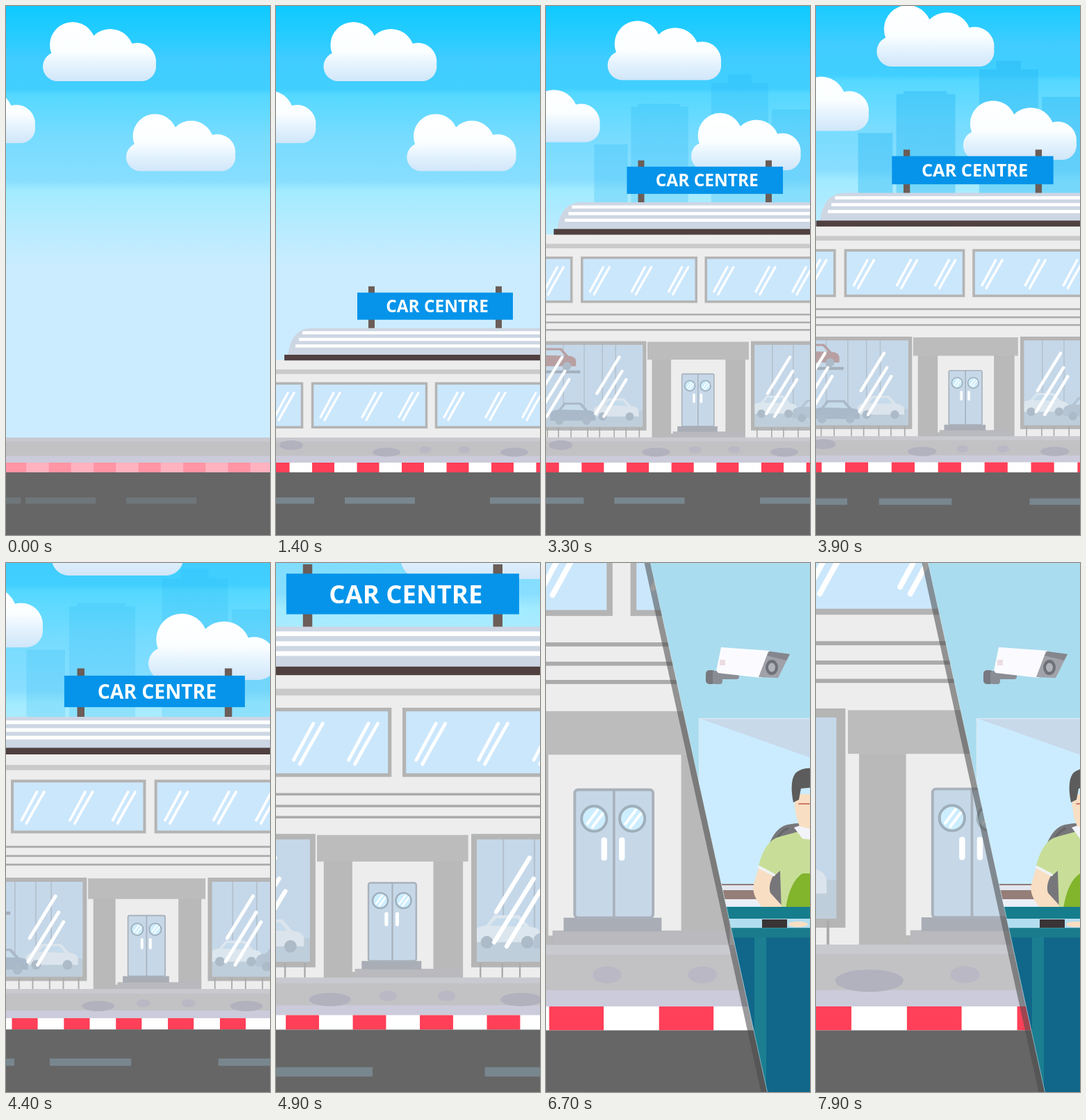
These frames come from a looping animation (380x760 px, 8000 ms). An HTML page:

```html
<!DOCTYPE html>
<html>
<head>
<meta charset="utf-8">
<style>
html, body { margin: 0; height: 100%; overflow: hidden; }
svg { display: block; }
</style>
</head>
<body>
<svg id="stage" width="380" height="760" viewBox="0 0 380 760"></svg>
<script>
const rect = (x, y, w, h, fill, more = '') =>
  `<rect x="${x}" y="${y}" width="${w}" height="${h}" fill="${fill}" ${more}/>`;
const oval = (x, y, rx, ry, fill, more = '') =>
  `<ellipse cx="${x}" cy="${y}" rx="${rx}" ry="${ry}" fill="${fill}" ${more}/>`;
const path = (d, fill, more = '') => `<path d="${d}" fill="${fill}" ${more}/>`;
const lines = (d, color, width) =>
  path(d, 'none', `stroke="${color}" stroke-width="${width}" stroke-linecap="round"`);
const group = (id, body, more = '') => `<g id="${id}" ${more}>${body}</g>`;
const shift = (x, y, body) => `<g transform="translate(${x} ${y})">${body}</g>`;
const stops = list => list.map(([at, c]) => `<stop offset="${at}" stop-color="${c}"/>`).join('');

const defs = `<defs>
  <linearGradient id="sky" gradientUnits="userSpaceOnUse" x2="0" y2="380">${stops([
    [0, '#0ecaff'], [.13, '#2accff'], [.2, '#40ccff'], [.315, '#40cfff'], [.335, '#55d8ff'],
    [.5, '#77dcff'], [.66, '#88deff'], [.7, '#a2ebff'], [.82, '#b5ebff'], [.93, '#c4ecff'], [1, '#cbecff']])}
  </linearGradient>
  <linearGradient id="puff" gradientUnits="userSpaceOnUse" y1="23" x2="0" y2="108">${stops([
    [0, '#fff'], [.5, '#fbfeff'], [.7, '#e6f4fe'], [1, '#d0e6f9']])}
  </linearGradient>
  <clipPath id="cut"><path d="M150.5 0H800V760H318.5Z"/></clipPath>
</defs>`;

const cloud = ['<g fill="url(#puff)">',
  '<rect x="53" y="66" width="163" height="42" rx="21"/>',
  '<circle cx="96" cy="56" r="33"/><circle cx="150" cy="67" r="34"/><circle cx="189" cy="80" r="27"/></g>'].join('');
const clouds = cloud + shift(-174, 89, cloud) +
  `<g transform="translate(121.8 133) scale(.965)">${cloud}</g>`;

const skyline = [[123, 146, 82], [133, 142, 60], [238, 112, 82], [262, 100, 34], [70, 200, 48], [325, 150, 60]]
  .map(([x, y, w]) => rect(x, y, w, 400, '#1fb4f2')).join('');

function upperWindow(x) {
  const glint = 'M13 50L32 15M19 54L30 34M25 43L41 15';
  return shift(x, 361, rect(1.5, 1.5, 164, 63, '#cbe7fc', 'stroke="#b4b4b4" stroke-width="3.5"') +
    [0, 60, 113].map(dx => shift(dx, 0, lines(glint, '#fff', 3.2))).join(''));
}

function car(x, y, color) {
  return shift(x, y, path('M0 26V16Q2 11 12 10L20 0H44L54 11Q64 12 65 18V26Z', color) +
    path('M16 10L22 3H42L49 11Z', '#c6dbeb') + oval(13, 26, 6, 6, '#adbbc9') + oval(52, 26, 6, 6, '#adbbc9'));
}

function shopWindow(x, glints, cars) {
  const glint = 'M24 75L56 23M22 104L60 43M34 108L66 55';
  const bars = [30, 60, 86, 105].map(dx => rect(dx, 4, 1.5, 120, '#b4c1cd')).join('');
  return `<svg x="${x}" y="482" width="150" height="128" overflow="hidden">` +
    rect(0, 0, 150, 128, '#c5d8e9') + bars + rect(0, 100, 150, 28, '#bfcedb') + cars +
    glints.map(dx => shift(dx, 0, lines(glint, '#fff', 4.2))).join('') +
    rect(2.5, 2.5, 145, 123, 'none', 'stroke="#b5b5b5" stroke-width="5.5"') + '</svg>';
}

function porthole(x) {
  return `<circle cx="${x}" cy="546" r="7.4" fill="#cdeeff" stroke="#9fafba" stroke-width="1.6"/>` +
    lines(`M${x - 4} 549l6 -8M${x - 1} 551l6 -8`, '#fff', 1.6);
}

const posts = [2, 18, 36, 60, 77, 98, 115, 134, 303, 324, 341, 362]
  .map(x => rect(x, 606, 1.6, 14, '#aaa')).join('');

const building =
  rect(133, 223, 9, 62, '#6b5d58') + rect(316, 223, 9, 62, '#6b5d58') +
  rect(117, 232, 224, 39, '#0594ea') +
  `<text x="232" y="260.6" text-anchor="middle" font-family="'Open Sans', 'Noto Sans', sans-serif"
    font-weight="700" font-size="24.4" fill="#fff">CAR CENTRE</text>` +
  path('M17 322Q22 284 50 283H400V322Z', '#cdd6e3') +
  rect(38, 287.5, 380, 4.5, '#fff') + rect(33, 297, 380, 4.5, '#fff') + rect(28, 306.5, 380, 4.5, '#fff') +
  rect(-10, 329, 420, 300, '#ededed') + rect(12, 321.3, 400, 8.2, '#504040') +
  rect(-10, 342.5, 420, 6.5, '#cacaca') +
  [-128, 51, 229].map(upperWindow).join('') +
  [442.7, 454, 464.7].map(y => rect(-10, y, 420, 2.4, '#ababab')).join('') +
  shopWindow(-5, [-27, 55],
    car(-16, 10, '#b8a0a2') + rect(-5, 42, 60, 4, '#a3afbb') + car(74, 82, '#dbe4ec') + car(12, 88, '#aab9c9')) +
  shopWindow(295, [0, 82], car(2, 78, '#dce6ee') + car(60, 84, '#b5c4d2')) +
  posts +
  rect(153, 500, 134, 122, '#b9b9b9') + rect(146.5, 483, 145.5, 25.5, '#bcbcbc') +
  rect(180.5, 508.5, 78, 106, '#ededed') +
  rect(183, 611.5, 103, 9, '#b9b9be') + rect(189.5, 604, 57.5, 8, '#a9adb5') +
  rect(196, 529, 46, 75, '#c6d8e8', 'rx="2" stroke="#a9b1bb" stroke-width="1.6"') +
  rect(218.3, 529, 1.5, 75, '#a9b1bb') + porthole(207.4) + porthole(229.8) +
  rect(211.6, 557, 3.4, 13.5, '#fff', 'rx="1.5"') + rect(222, 557, 3.4, 13.5, '#fff', 'rx="1.5"');

const dashes = [-154, -46, 99, 308, 416].map(x => rect(x, 706, 101, 9, '#78868e')).join('');
const curbs = Array.from({ length: 12 }, (_, i) => rect(-206 + i * 64.5, 656, 32, 14, '#ff4058')).join('');
const street =
  rect(-10, 620, 420, 36, '#c2c2c5') + rect(-10, 620, 420, 5.5, '#c9c9d0') + rect(-10, 646.5, 420, 9.5, '#cbcbdb') +
  group('spots', [[22, 631, 17, 7], [159, 641, 20, 6.5], [343, 641, 20, 6.5]]
    .map(o => oval(...o, '#b2b1be')).join('') +
    oval(215, 637.5, 8.5, 5, '#b9b8c4') + oval(271, 637.5, 8.5, 5, '#b9b8c4')) +
  rect(-10, 656, 420, 14, '#fff') + group('curbs', curbs) +
  rect(-10, 656, 420, 14, '#ffa5b4', 'id="blur"') +
  rect(-10, 670, 420, 100, '#666') + group('dashes', dashes);

const cctv =
  rect(256, 157, 34, 10, '#8b8d95', 'rx="4"') + rect(242, 154, 14, 20, '#77797f', 'rx="5"') +
  rect(252, 155, 14, 19, '#8b8d95', 'rx="4"') +
  path('M264 121L334 126L322 165L260 158Q256 156 258 150Z', '#fbfbff') +
  path('M332 127L363 131L346 165L318 164Z', '#a0a1a9') + path('M334 127L363 131L358 140L330 133Z', '#85868e') +
  oval(337, 150, 9, 11, '#6f7178') + oval(337, 150, 5, 6.5, '#b0b2b9') +
  rect(262, 139, 8, 8, '#ecdde2');

const clerk =
  path('M325 500Q320 385 360 374Q385 368 410 376V500Z', '#77777b') +
  path('M331 500Q327 392 362 379', 'none', 'stroke="#66666a" stroke-width="3"') +
  path('M320 432L342 444Q332 460 336 472L356 494H325Q308 474 312 460Z', '#f8dec2') +
  path('M319 433Q328 396 350 391L376 384H410V500H352L350 440L341 448Z', '#c8de98') +
  lines('M320 435L341 446', '#eef4f6', 4) +
  path('M370 378L382 374H400V396L382 394Z', '#f2f4fa') +
  path('M370 330H400V382L378 376Q371 362 370 330Z', '#f8dec2') +
  path('M369 342Q363 312 372 300Q384 290 400 294V320L380 322L377 338Z', '#5c5c5c') +
  lines('M377 344H392', '#c4584e', 1.5) +
  path('M358 494Q364 456 382 444H410V500H358Z', '#82b42c');

const books = rect(262, 461, 58, 2, '#8f7a78') + rect(262, 463, 56, 7, '#e3e6ee') +
  rect(262, 470, 60, 13, '#957d78') + rect(262, 483, 62, 10, '#eceff5');

const counter =
  rect(200, 494, 400, 300, '#10678a') + rect(200, 494, 400, 17, '#167d8d') +
  rect(200, 511, 400, 13.5, '#b2def0') + rect(200, 524.5, 400, 13.5, '#1a7b8c') +
  group('props', rect(322, 512, 36, 12, '#3a3436') + oval(374, 519, 14, 4, '#f8dec2')) +
  rect(311, 538, 17, 170, '#1b7f91', 'id="post"');

const office =
  rect(100, 0, 700, 760, '#a9dcee') +
  group('board', rect(230, 223, 300, 290, '#cbecff') + path('M230 223H400V283Z', '#c8d9ea') +
    path('M230.5 510V223.5H500', 'none', 'stroke="#d5e8f4" stroke-width="1.5"')) +
  group('bubble', oval(381, 475, 35, 36, '#98cfdc')) +
  group('books', books) + group('clerk', clerk) + group('counter', counter) + group('cctv', cctv);

const $ = id => document.getElementById(id);
$('stage').innerHTML = defs +
  group('world', rect(-10, -10, 420, 780, 'url(#sky)') + group('skyline', skyline) +
    group('clouds', clouds) + group('building', building) + street) +
  group('panel', path('M141.5 0H150.5L318.5 760H309.5Z', '#4a4a4a', 'opacity=".55"') +
    group('office', office, 'clip-path="url(#cut)"') +
    path('M150.5 0L318.5 760', 'none', 'stroke="#d5e6ee" opacity=".5"'));

const span = (t, a, b) => Math.min(1, Math.max(0, (t - a) / (b - a)));
const inOut = (p, n) => p < .5 ? (2 * p) ** n / 2 : 1 - (2 - 2 * p) ** n / 2;
const out = p => 1 - (1 - p) ** 3;
const sine = p => (1 - Math.cos(Math.PI * p)) / 2;
const move = (id, x, y) => $(id).setAttribute('transform', `translate(${x} ${y})`);
const fade = (id, v) => $(id).setAttribute('opacity', v);

function draw(t) {
  // street slides to a stop, then the showroom rises behind it
  const slide = 74.5 * (1 - out(span(t, 0, 600)));
  move('curbs', slide, 0);
  move('dashes', slide, 0);
  fade('blur', .85 * (1 - span(t, 0, 350)));
  fade('dashes', .5 + .5 * span(t, 0, 350));
  fade('spots', span(t, 100, 500));
  move('clouds', t * .011, 0);
  move('building', 0, 400 * (1 - inOut(span(t, 780, 1980), 3)));
  fade('skyline', .35 * span(t, 2600, 3700) * (1 - span(t, 4000, 4800)));

  // camera zoom and later pan
  const zoom = 1 + 1.46 * inOut(span(t, 2425, 7775), 5);
  const pan = 157.5 * sine(span(t, 6200, 7950));
  $('world').setAttribute('transform', `translate(${323 + pan} 669) scale(${zoom}) translate(-323 -669)`);

  // office panel
  const drift = 11 * sine(span(t, 7200, 7900));
  const settle = out(span(t, 5700, 6500));
  move('panel', 420 * (1 - out(span(t, 5200, 5700))) + drift, 0);
  move('board', -4 - 6 * settle, 39 * (1 - settle));
  move('counter', -9 - 2 * settle, 10 * settle - 10);
  $('post').setAttribute('height', 156 + 90 * settle);
  fade('bubble', 1 - span(t, 5750, 6000));
  fade('props', span(t, 6300, 6600));
  move('books', -11, 60 * (1 - out(span(t, 5900, 6500))));
  move('clerk', -13, 2 + 230 * (1 - out(span(t, 5900, 6700))));
  const hidden = 1 - out(span(t, 5700, 6300));
  move('cctv', -165 * hidden - 12 * settle, 30 * hidden);
}

const start = performance.now();
function tick() {
  draw((performance.now() - start) % 8000);
  requestAnimationFrame(tick);
}
draw(0);
requestAnimationFrame(tick);
</script>
</body>
</html>
```
